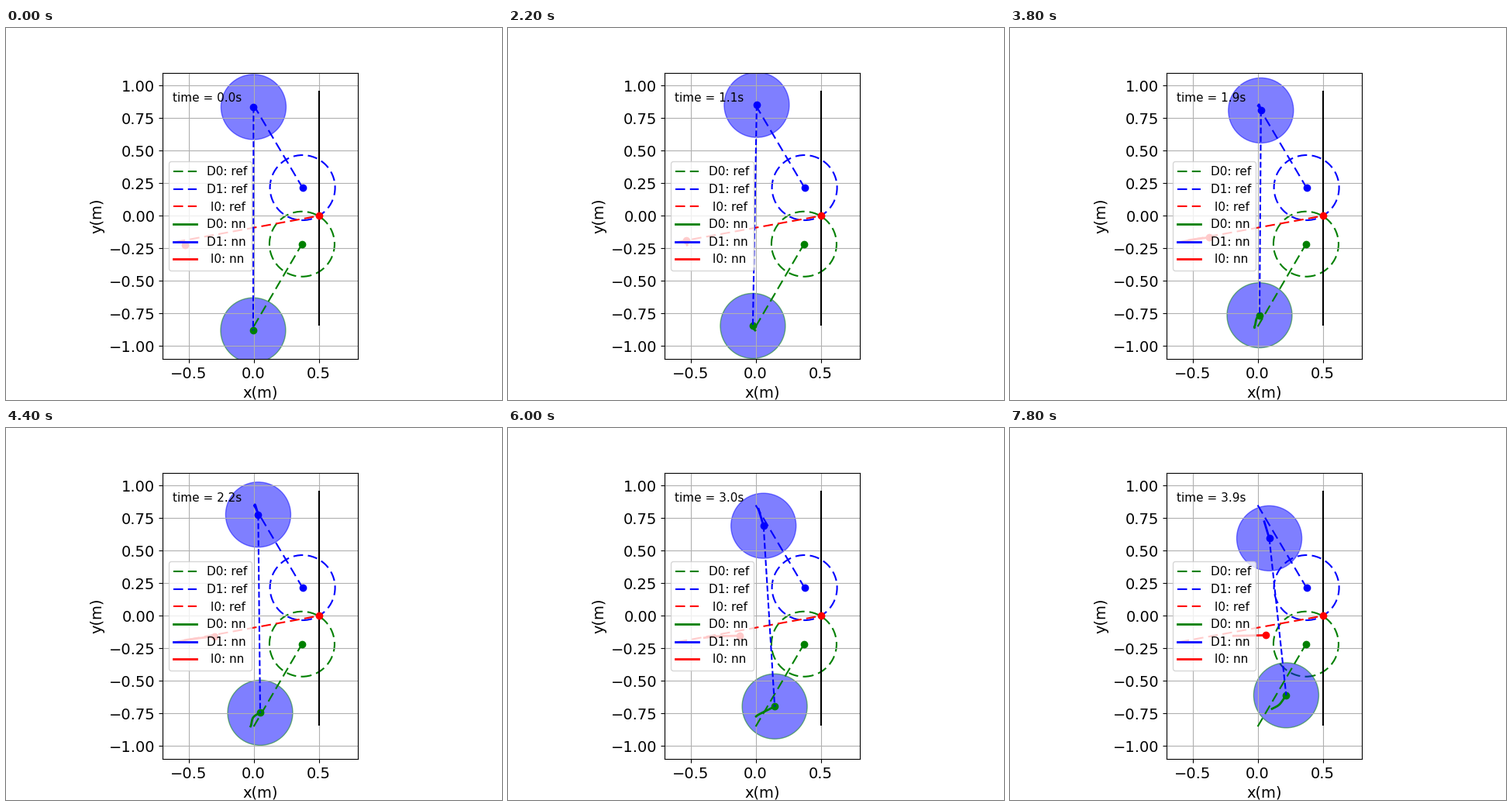
Animation of 640x480 px, one loop 8 s. Source, as a matplotlib script:

```python
import numpy as np
import matplotlib.pyplot as plt
from matplotlib.animation import FuncAnimation

FRAMES, STEP_MS, TAIL = 40, 200, 12
RADIUS = 0.25
DASHED = (0, (6, 3))
COLORS = {"D0": "green", "D1": "blue", " I0": "red"}
DY = RADIUS * np.sin(np.pi / 3)
REFS = {
    "D0": ((0, 0.371), (-0.85, -DY)),
    "D1": ((0, 0.375), (0.85, DY)),
    " I0": ((-0.6, 0.5), (-0.2, 0)),
}

t = np.arange(FRAMES) / 10


def drift(start, speed, *turns, blend=0.06):
    """Steady motion whose speed changes softly at each (time, change)."""
    pos = start + speed * t
    for when, change in turns:
        pos = pos + change * blend * np.logaddexp(0, (t - when) / blend)
    return pos


tracks = {
    "D0": (drift(-0.004, -0.03, (0.8, 0.05), (1.7, 0.1), (3.2, -0.05)),
           drift(-0.879, 0.03, (1.2, 0.09), (1.85, -0.06), (3.1, 0.04))),
    "D1": (drift(-0.001, 0.008, (1.45, 0.024)),
           drift(0.836, 0.015, (1.45, -0.122))),
    " I0": (drift(-0.527, -0.01, (1.2, 0.25), (2.5, -0.035)),
            drift(-0.224, 0.031, (2.2, -0.027))),
}

plt.rcParams.update({"font.family": "DejaVu Sans", "font.size": 14})
fig, ax = plt.subplots(figsize=(6.4, 4.8), dpi=100)
ax.set_aspect("equal")
ax.set(xlim=(-0.7, 0.8), ylim=(-1.1, 1.1), xlabel="x(m)", ylabel="y(m)",
       xticks=[-0.5, 0, 0.5], yticks=np.arange(-1, 1.01, 0.25))
ax.grid(True)

ax.plot([0.5, 0.5], [-0.838, 0.955], color="black", lw=1.5)

for name, (x, y) in REFS.items():
    color = COLORS[name]
    ax.plot(x, y, ls=DASHED, color=color, lw=1.5, label=f"{name}: ref")
    ax.plot(x[1], y[1], "o", color=color)
    if name != " I0":
        ax.add_patch(plt.Circle((x[1], y[1]), RADIUS, fill=False, ec=color,
                                ls=DASHED, lw=1.5))

tails, dots, discs = {}, {}, {}
for name, color in COLORS.items():
    tails[name], = ax.plot([], [], color=color, lw=2, label=f"{name}: nn")
    dots[name], = ax.plot([], [], "o", color=color)
    if name != " I0":
        discs[name] = ax.add_patch(
            plt.Circle((0, 0), RADIUS, fc="blue", ec=color, alpha=0.5))
tether, = ax.plot([], [], "--", color="blue", lw=1.5)

clock = ax.text(0.05, 0.9, "", transform=ax.transAxes, fontsize=11)
ax.legend(loc="center left", fontsize=11)


def update(i):
    first = max(0, i - TAIL)
    for name, (x, y) in tracks.items():
        tails[name].set_data(x[first:i + 1], y[first:i + 1])
        dots[name].set_data([x[i]], [y[i]])
        if name in discs:
            discs[name].center = x[i], y[i]
    (x0, y0), (x1, y1) = tracks["D0"], tracks["D1"]
    tether.set_data([x1[i], x0[i]], [y1[i], y0[i]])
    clock.set_text(f"time = {t[i]:.1f}s")
    return [*tails.values(), *dots.values(), *discs.values(), tether, clock]


anim = FuncAnimation(fig, update, frames=FRAMES, interval=STEP_MS,
                     repeat=True, repeat_delay=0)
plt.show()
```
